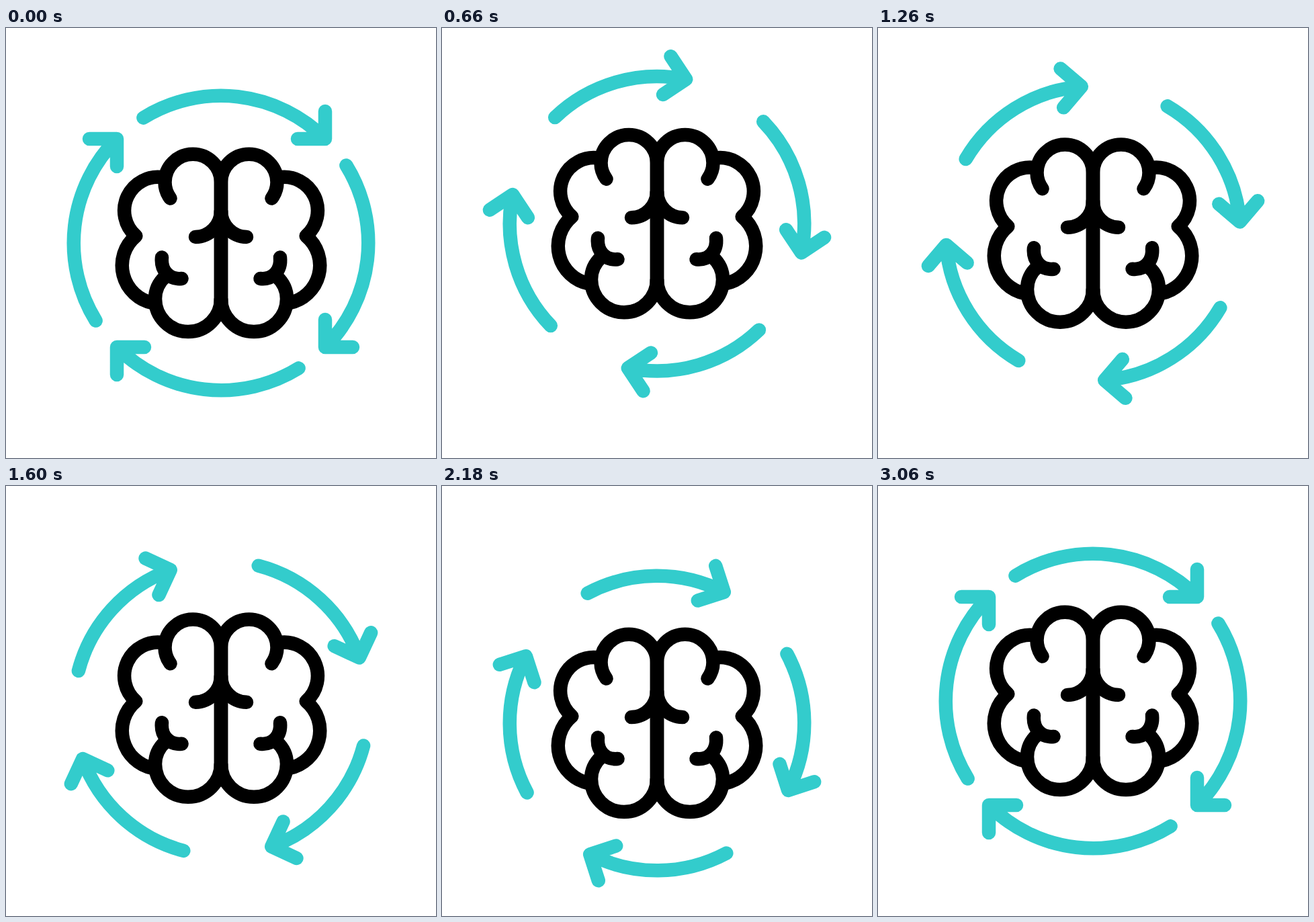
Animation, 640 px wide and 640 px high, one loop 3600 ms. Source, as an HTML page:

```html
<!DOCTYPE html>
<html lang="en">
<head>
<meta charset="utf-8">
<title>Brain cycle</title>
<style>
  html, body { margin: 0; height: 100%; overflow: hidden; background: #fff; }
  svg { display: block; width: 100%; height: 100%; }
  path { fill: none; stroke-linecap: round; stroke-linejoin: round; }
  #scene { stroke-width: 20.5; }
  #ring, #glow { stroke: #33cccc; }
  #dark { stroke: #000; }
  #glow { stroke-width: 23; }
</style>
</head>
<body>
<svg viewBox="0 0 640 640">
  <defs>
    <g id="half">
      <path d="M320 420V229.5A41.7 41.7 0 0 0 236.5 229.5C236.5 238 239 246 244.5 253.5"/>
      <path d="M320 272A38.5 39 0 0 1 282 311"/>
      <path d="M234 222.5A50 50 0 0 0 193.3 309.6A57.1 57.1 0 0 0 219 409.5"/>
      <path d="M320 403A49 49 0 0 1 222 403C222 390 227 379 237 370"/>
      <path d="M232 341.5C230 361 243 375 261.5 373"/>
    </g>
    <g id="brain">
      <use href="#half"/>
      <use href="#half" transform="matrix(-1 0 0 1 640 0)"/>
    </g>
    <path id="arrow"/>
  </defs>
  <g id="scene">
    <g id="ring">
      <use href="#arrow"/>
      <use href="#arrow" transform="rotate(90 320 320)"/>
      <use href="#arrow" transform="rotate(180 320 320)"/>
      <use href="#arrow" transform="rotate(270 320 320)"/>
    </g>
    <use id="dark" href="#brain"/>
    <use id="glow" href="#brain"/>
  </g>
</svg>
<script>
const LOOP = 3600, STEP = 20, RADIUS = 219.3;
const byId = id => document.getElementById(id);
const scene = byId('scene'), ring = byId('ring'), arrow = byId('arrow'), glow = byId('glow');

// Keys are [step, value] pairs, eased in and out between neighbours.
const lift = [[12, 0], [39.5, -33.5], [106, 33.5], [150.5, 0]];
const spin = [[12, 0], [28.8, -35], [151, 360]];
const sweep = [[12, 76.8], [27, 55.2], [117.5, 55.2], [152, 76.8]];
const tint = [[113, 0], [125, 1], [131, 1], [146, 0]];

function at(keys, f) {
  if (f <= keys[0][0]) return keys[0][1];
  for (let i = 1; i < keys.length; i++) {
    const [f0, v0] = keys[i - 1], [f1, v1] = keys[i];
    if (f < f1) {
      const u = (f - f0) / (f1 - f0);
      return v0 + (v1 - v0) * u * u * (3 - 2 * u);
    }
  }
  return keys[keys.length - 1][1];
}

function draw(now) {
  const f = Math.floor(now % LOOP / STEP);
  const tail = (45 - at(sweep, f)) * Math.PI / 180;
  const x = 320 + RADIUS * Math.sin(tail), y = 320 - RADIUS * Math.cos(tail);
  arrow.setAttribute('d',
    `M${x} ${y}A${RADIUS} ${RADIUS} 0 0 1 475 165M434 165H475V124`);
  ring.setAttribute('transform', `rotate(${at(spin, f)} 320 320)`);
  scene.setAttribute('transform', `translate(0 ${at(lift, f)})`);
  glow.setAttribute('opacity', at(tint, f));
}

const start = performance.now();
(function tick() {
  draw(performance.now() - start);
  requestAnimationFrame(tick);
})();
</script>
</body>
</html>
```
